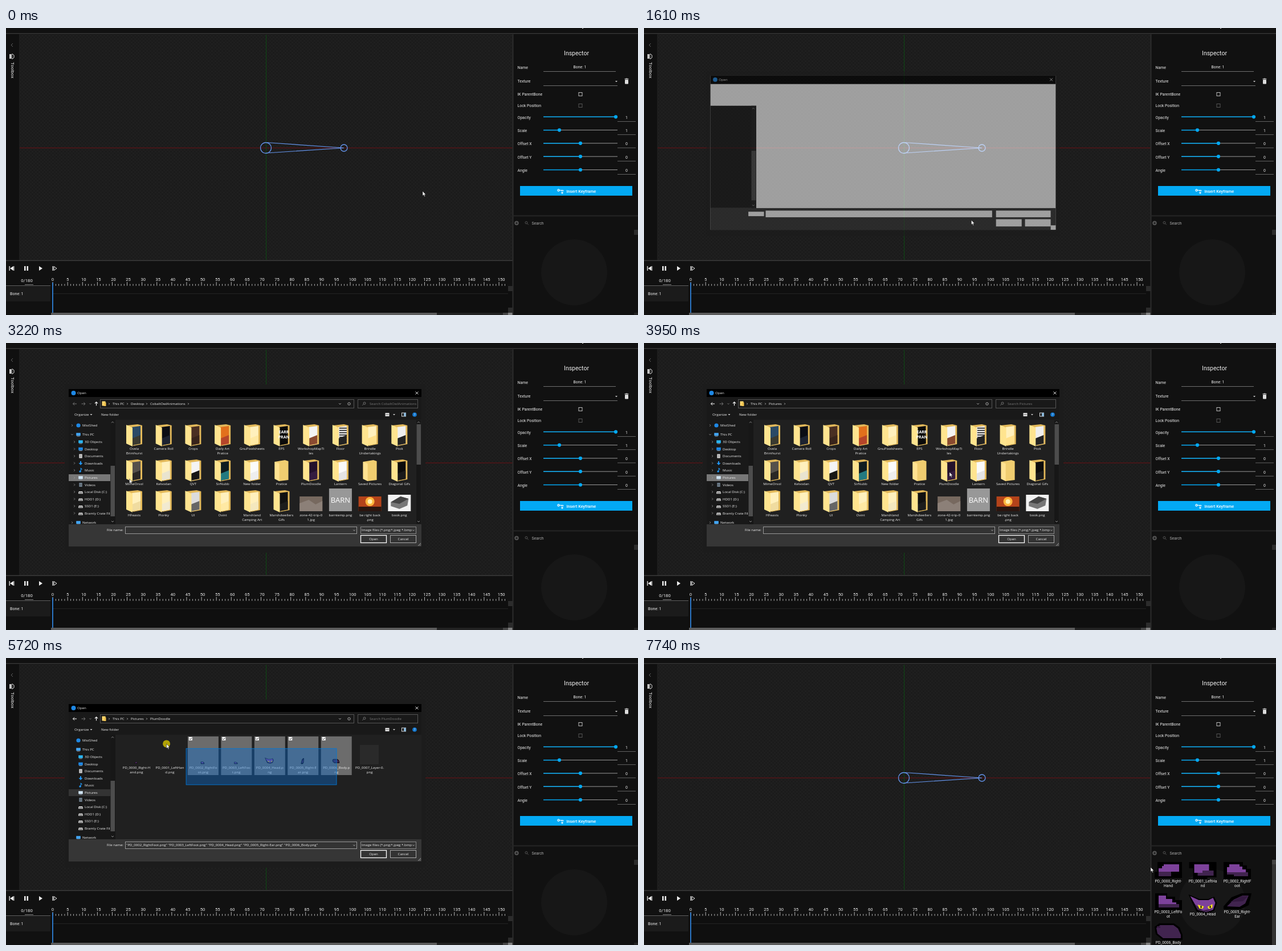
Write an HTML page that moves like this. It is 1109x505 px and loops after 8 s.

```html
<!DOCTYPE html>
<html lang="en">
<head>
<meta charset="utf-8">
<title>Bone editor</title>
<style>
html, body { margin: 0; width: 100%; height: 100%; overflow: hidden; background: #111; }
svg { display: block; width: 100%; height: 100%; }
text { font-family: Roboto, sans-serif; white-space: pre; }
.win text { font-family: "Open Sans", "Noto Sans", sans-serif; }
</style>
</head>
<body>
<svg id="stage" viewBox="0 0 1109 505" xmlns="http://www.w3.org/2000/svg"></svg>
<script>
const LOOP = 8000;
const BLUE = '#03a9f4';

// ---- drawing helpers ----
const rect = (x, y, w, h, fill, more = '') =>
  `<rect x="${x}" y="${y}" width="${w}" height="${h}" fill="${fill}" ${more}/>`;
const box = (x, y, w, h, stroke, fill = 'none', sw = 1) =>
  rect(x + .5, y + .5, w - 1, h - 1, fill, `stroke="${stroke}" stroke-width="${sw}"`);
const disc = (x, y, r, fill, more = '') => `<circle cx="${x}" cy="${y}" r="${r}" fill="${fill}" ${more}/>`;
const ring = (x, y, r, stroke, sw = 1) => disc(x, y, r, 'none', `stroke="${stroke}" stroke-width="${sw}"`);
const path = (d, fill, more = '') => `<path d="${d}" fill="${fill}" ${more}/>`;
const line = (d, stroke, sw = 1) => path(d, 'none', `stroke="${stroke}" stroke-width="${sw}"`);
const text = (x, y, s, size = 6.9, fill = '#eee', anchor = 'start', more = '') =>
  `<text x="${x}" y="${y + size * .36}" font-size="${size}" fill="${fill}" text-anchor="${anchor}" ${more}>${s}</text>`;
const group = (body, attrs = '') => `<g ${attrs}>${body}</g>`;
const at = (x, y, body, k = 1) => group(body, `transform="translate(${x} ${y}) scale(${k})"`);
const chevron = (x, y, dir, color = '#aaa', r = 2) => at(x, y, line({
  r: `M${-r / 2},${-r}L${r / 2},0L${-r / 2},${r}`,
  l: `M${r / 2},${-r}L${-r / 2},0L${r / 2},${r}`,
  d: `M${-r},${-r / 2}L0,${r / 2}L${r},${-r / 2}`,
  u: `M${-r},${r / 2}L0,${-r / 2}L${r},${r / 2}`
}[dir], color, .8));
const caret = (x, y, color = '#ccc') => path(`M${x - 2},${y - 1}h4l-2,2.2z`, color);

// ---- editor ----
function viewport() {
  return rect(23, 11, 866, 398, 'url(#weave)') +
    rect(24, 210.5, 865, 1, '#6e1014') + rect(456, 12, 1, 396, '#0c4a12') +
    group(ring(456, 211, 9.5, '#6495ed', 1.3) + ring(593, 211, 6, '#6495ed', 1.3) +
      line('M457,201.5L593,211L457,220', '#6495ed', 1.2));
}

function toolbar() {
  return rect(0, 0, 1109, 9, '#111') + rect(0, 9, 1109, 1.3, '#3a3a3a') + rect(1011, 0, 2, 1, '#ddd') +
    rect(0, 11, 23, 398, '#101010') + chevron(10.5, 30, 'l', '#777', 3) +
    rect(6, 46, 3, 8, '#ccc') + path('M10,46h2l2,2v4l-2,2h-2z', 'none', 'stroke="#ddd"') +
    at(11.5, 60, text(0, 0, 'Toolbox', 8, '#eee', 'start', 'transform="rotate(90)"'));
}

function timeline() {
  let s = rect(0, 409, 889, 96, '#111') + rect(0, 408.5, 889, 1.5, '#3a3a3a') +
    path('M13,419v8l-6,-4z', '#eee') + rect(5.5, 419, 1.3, 8, '#eee') + rect(13.5, 419, 1, 8, '#eee') +
    rect(32, 419, 2.5, 8, '#eee') + rect(36.5, 419, 2.5, 8, '#eee') +
    path('M58,419v8l6,-4z', '#eee') +
    rect(81.5, 419, 1.3, 8, '#eee') + path('M84,419.5v7l5,-3.5z', 'none', 'stroke="#eee"') +
    text(36.5, 444, '0/180', 7.8, '#eee', 'middle') + rect(33, 451, 15, .8, '#999') +
    rect(0, 453, 78, 1, '#666') + rect(0, 455, 78, 26, '#1b1b1b') + text(7, 467.5, 'Bone: 1', 7.1) +
    rect(78, 455, 811, 46, '#0f0f0f') + rect(82, 467, 799, 1, '#242424');
  for (let i = 0; i <= 152; i++) {
    const major = i % 5 === 0;
    s += rect(81.6 + i * 5.22, major ? 447 : 450.5, .9, major ? 6.5 : 3, '#ccc');
    if (major && i <= 150) s += text(79.8 + i * 5.22, 442, i, 7.6);
  }
  return s + rect(81, 448, 1.8, 57, '#2f80d8') +
    rect(79, 501, 810, 4, '#222') + rect(79, 501, 677, 4, '#5c5c5c') +
    rect(872, 501, 9, 4, '#444') + rect(881, 501, 8, 4, '#808080') +
    rect(881, 454, 8, 9, '#2c2c2c') + rect(881, 492, 8, 9, '#2c2c2c');
}

function slider(label, y, knob, value) {
  return text(897.5, y + 1, label) + rect(943, y - .7, 130, 1, '#999') +
    rect(943, y - .9, knob - 943, 1.5, BLUE) + disc(knob, y - .2, 3.1, BLUE) +
    text(1089, y + 1, value, 6.9, '#eee', 'middle') + rect(1073, y + 7.5, 32, .8, '#777');
}

function inspector() {
  return rect(889, 11, 220, 494, '#111') + rect(888.5, 11, 2, 494, '#2c2c2c') +
    text(1001, 44, 'Inspector', 10.5, '#eee', 'middle') +
    text(897.5, 70, 'Name') + text(1007, 69, 'Bone: 1', 6.9, '#eee', 'middle') + rect(943, 76, 127, .8, '#888') +
    text(897.5, 94, 'Texture') + rect(943, 101, 130, .8, '#888') + caret(1071, 94) +
    rect(1086, 91, 6, 7.5, '#ddd', 'rx="1"') + rect(1085.5, 89.2, 7, 1.1, '#ddd') + rect(1087.5, 88.5, 3, 1, '#ddd') +
    text(897.5, 116.5, 'IK ParentBone') + box(1004.5, 113, 7, 7, '#bbb') +
    text(897.5, 136.5, 'Lock Position') + box(1004.5, 133, 7, 7, '#555') +
    slider('Opacity', 156.5, 1070, 1) + slider('Scale', 179.8, 971, 1) + slider('Offset X', 203, 1008, 0) +
    slider('Offset Y', 226.3, 1008, 0) + slider('Angle', 249.7, 1008, 0) +
    rect(902, 278, 197, 17, BLUE) + text(983.5, 287, 'Insert Keyframe', 7.25, '#fff', 'start', 'font-weight="500"') +
    ring(969.5, 285.5, 1.6, '#fff', 1.2) + line('M971,285.5h6.5v2M975,285.5v2M974,290h4M976,288v4', '#fff', 1.1) +
    rect(889, 329.5, 220, 2, '#262626') +
    disc(896, 343.3, 3.7, '#555') + line('M894,343.3h4M896,341.3v4', '#111') +
    ring(913, 342.5, 2, '#555') + line('M914.5,344l2.3,2.3', '#555') + text(922.5, 343.5, 'Search', 6.9, '#aaa') +
    disc(997, 430, 58, '#171717') +
    rect(1102, 355, 7, 9, '#2c2c2c') + rect(1102, 501, 7, 4, '#222');
}

// ---- sprites: black silhouette, then coloured patches ----
const LIGHT = '#7d429b', DARK = '#41244f';
const sprites = [
  ['M-19,-15H24V13H-24V2H-19Z', 'M-8,-11H19V2H-17V-4H-11V-8H-8Z', 'M-17,2H5V10H-17Z'],
  ['M-24,-15H24V12H8V15H-17V-4H-24Z', 'M-15,-11H11V0H0V4H-15Z', 'M-9,4H0V0H19V9H-9Z'],
  ['M-24,-15H10V-9H17V-3H24V15H-24Z', 'M-14,-11H4V-7H9V-2H15V3H-18V-6H-14Z', 'M-18,3H19V10H-6V7H-18Z'],
  ['M-23,-14H-2V-8H12V-2H24V15H-23Z', 'M-17,-10H-4V-4H7V2H14V5H-17Z', 'M-17,5H19V11H-17Z'],
  ['M-25,-17L-6,-9H10L20,-13L25,-2L20,12L6,17L-11,13L-17,1Z', 'M-22,-14L-7,-7H10L18,-11L22,-2L18,10L6,14L-9,10L-14,0Z', 'M-14,0L0,11L18,8L6,14L-9,10Z'],
  ['M-24,9L-10,-7L8,-14H25L20,7L6,14H-24Z', 'M-12,1L8,-9H19L10,0Z', 'M-18,9L-6,-3L9,-10H20L14,4L4,10Z'],
  ['M-24,-9L-16,-15H10L20,-8L25,5V14H-10L-22,4Z', 'M-20,-7H-14V-10H-20Z', 'M-21,-7L-14,-12H9L17,-6L22,5V11H-9L-19,3Z']
];
function sprite(i) {
  const [edge, lit, shade] = sprites[i];
  const eyes = i === 4 ? path('M-9,1L2,4L0,8H-6ZM8,5L17,0V6L11,9Z', '#f2df22') + rect(-4, 3, 2, 4, '#111') + rect(12, 3, 2, 4, '#111') : '';
  const low = i >= 5;
  return path(edge, '#000') + path(low ? shade : lit, low ? DARK : LIGHT) + path(low ? lit : shade, low ? '#33193f' : DARK) + eyes;
}

const parts = ['Right-Hand', 'LeftHand', 'RightFoot', 'LeftFoot', 'Head', 'Right-Ear', 'Body', 'Layer-0'];
const partName = i => `PD_000${i}_${parts[i]}`;

function assets() {
  let s = rect(1102, 355, 7, 150, '#333') + rect(1102, 355, 7, 8, '#444');
  for (let i = 0; i < 7; i++) {
    const x = 920 + (i % 3) * 60.5, row = Math.floor(i / 3);
    const name = partName(i), short = name.length <= 12;
    s += at(x, 374 + row * 54 + (i === 4 ? 5 : 0), sprite(i));
    const y = [393, 447, 501][row] + (i === 4 ? 4 : 0);
    s += text(x, y, short ? name : name.slice(0, 14), 6.7, '#eee', 'middle');
    if (!short) s += text(x, y + 8, name.slice(14), 6.7, '#eee', 'middle');
  }
  return s;
}

// ---- file window ----
const WT = 6.1;
const label = (x, y, s, fill = '#eee', anchor = 'start') => text(x, y, s, WT, fill, anchor);

function skeleton() {
  const w = '#fff';
  return rect(110, 81, 619, 277, w) + rect(110, 81, 619, 15, '#000') + rect(110, 135, 82, 184, '#191919') +
    rect(183, 135, 9, 184, '#1d1d1d') + rect(183.5, 216, 8, 89, '#4d4d4d') +
    chevron(187, 140, 'u') + chevron(187, 314, 'd') + rect(110, 319, 619, 39, '#363636') +
    rect(178, 325.5, 28, 8, w) + rect(209, 323.5, 406, 12, w) + rect(622, 323.5, 98, 12, w) +
    rect(622, 339, 46, 13, w) + rect(674, 339, 46, 13, w) + rect(720, 350, 9, 8, w);
}
const titleBar = () => disc(118.5, 88, 4, '#1e88e5') + label(125, 88.3, 'Open') +
  line('M718.5,85.5l5,5m0,-5l-5,5', '#eee', .9);

const places = [
  ['MistShed', 145, '#1e88e5', 'o'], ['This PC', 161, '#42a5f5'], ['3D Objects', 174, '#29b6f6'],
  ['Desktop', 186.5, '#1e88e5'], ['Documents', 199, '#ddd', 'p'], ['Downloads', 211.5, '#2196f3', 'v'],
  ['Music', 224, '#2196f3', 'n'], ['Pictures', 237, '#cfe3f2'], ['Videos', 249.5, '#6d7f8f', 'p'],
  ['Local Disk (C:)', 262, '#ccc', 'd'], ['HDD1 (D:)', 274.5, '#ccc', 'd'], ['SSD1 (E:)', 287, '#ccc', 'd'],
  ['Bramly Crate File', 299.5, '#ccc', 'd'], ['Network', 316, '#42a5f5']
];
function placeIcon(x, y, c, kind) {
  if (kind === 'o') return disc(x, y, 3.6, c);
  if (kind === 'p') return rect(x - 2.7, y - 3.5, 5.4, 7, c) + rect(x - 1.5, y - 1.5, 3, .8, '#555') + rect(x - 1.5, y + .7, 3, .8, '#555');
  if (kind === 'v') return path(`M${x - 1},${y - 3.5}h2v3h2.5l-3.5,4l-3.5,-4h2.5z`, c);
  if (kind === 'n') return disc(x - 1, y + 2, 1.7, c) + line(`M${x + .3},${y + 2}v-5.5l2.2,2`, c, 1.1);
  if (kind === 'd') return path(`M${x - 3},${y - 1}h6l1,2v2.2h-8v-2.2z`, c) + rect(x - 3, y + 1.2, 6, .8, '#333');
  return rect(x - 3.8, y - 2.8, 7.6, 5, c) + rect(x - 2.6, y + 2.6, 5.2, .9, '#9ab');
}

function sidebar() {
  let s = rect(110, 135, 82, 184, '#191919') + rect(110, 231, 73, 12, '#333', 'id="place"');
  let arrows = '';
  for (const [name, y, color, kind] of places) {
    const inner = y > 165 && y < 310;
    s += placeIcon(inner ? 131 : 127, y, color, kind) + label(inner ? 138 : 134, y, name);
    arrows += chevron(inner ? 120 : 116, y, name === 'This PC' ? 'd' : 'r', '#999', 1.8);
  }
  return s + group(arrows, 'id="arrows"') + rect(183, 135, 9, 184, '#171717') + rect(183.5, 216, 7.5, 89, '#4d4d4d') +
    chevron(187, 139.5, 'u') + chevron(187, 314, 'd');
}

const crumbs = (mid, last, more) => chevron(181, 107, 'r', '#ccc', 1.4) + label(187, 107, 'This PC') +
  chevron(213, 107, 'r', '#ccc', 1.4) + label(219, 107, mid) +
  (last ? chevron(247, 107, 'r', '#ccc', 1.4) + label(253, 107, last) : '') +
  (more ? chevron(last ? 320 : 247, 107, 'r', '#ccc', 1.4) : '') +
  label(638, 107, 'Search ' + (last || mid), '#777');

const folders = [
  ['Ovela|Brimhurst', '#2b4a66', '#3a3a30'], ['Camera Roll', '#0b0d14', '#1c2230'], ['Crops', '#4a2f22', '#38241b'],
  ['Daily Art|Pratice', '#e2701c', '#b5452a'], ['GnuPixelsheets', '#fff0bd', '#ffe9a4'], ['EPS', '#0a0a0a', '#0a0a0a'],
  ['WorkshopMapTi|les', '#f4f4f4', '#8a4a30'], ['Floor', '#e8e8e8', '#222'], ['Brindle|Undertakings', '#fff0bd', '#ffe08a'],
  ['Ptok', '#efefef', '#222'],
  ['MimeOrsol', '#55504b', '#2a2725'], ['Kelvodan', '#fff0bd', '#e9e4cf'], ['QVT', '#f4f4f4', '#161616'],
  ['SirNubb', '#101c20', '#237a80'], ['New folder', '#fbfbfb', '#eee'], ['Pratice'], ['PlumDoodle', '#24122c', '#341c40'],
  ['Lantern', '#fafafa', '#e4e4e4'], ['Saved Pictures'], ['Diagonal Gifs', '#0c0c0c', '#1a1a1a'],
  ['HFeasts', '#fff0bd', '#f0dca0'], ['Plonky', '#fff0bd', '#f2ead0'], ['UI', '#dcdcdc', '#666'],
  ['Ovint', '#fff0bd', '#ffe9a4'], ['Marshland|Camping Art', '#fff0bd', '#f4e8be'], ['Marshdwellers|Gifs', '#111', '#1c1c1c'],
  ['zone-42-trip-0|1.jpg'], ['barntemp.png'], ['be right back|.png'], ['book.png']
];
function folder(a, b) {
  if (!a) return path('M-12,-15L6,-18L12,-16V17L-4,19L-12,15Z', '#f0cd70') + path('M-12,-15L-4,-12V19L-12,15Z', '#ffe291');
  return path('M-13,-17L6,-19L14,-17V16L-2,19Z', '#e3b95a') + path('M-4,-14L11,-16V15L-4,18Z', a) +
    path('M-4,6L11,0V15L-4,18Z', b) + path('M-14,-18L-3,-13V20L-14,15Z', '#ffe48f');
}
const pictures = [
  rect(-20, -8, 40, 26, '#77695f') + path('M-20,4L-4,-2L8,6L20,0V18H-20Z', '#8c8078'),
  rect(-20, -22, 40, 40, '#989898') + text(0, -2, 'BARN', 13, '#fff', 'middle'),
  rect(-20, -8, 40, 26, '#b4431a') + disc(0, 1, 8, '#ffb43c') + disc(0, 1, 4, '#fff0b0') + rect(-20, 10, 40, 8, '#2b1610'),
  rect(-20, -11, 40, 29, '#f2f2f2') + path('M-15,2L2,-8L16,-4L14,8L0,14L-15,9Z', '#777') + path('M-15,2L2,-8L16,-4L0,5Z', '#444')
];
function library() {
  let s = '';
  folders.forEach(([name, a, b], i) => {
    const x = 225 + (i % 10) * 51.7, row = Math.floor(i / 10);
    const y = [162, 224, 278][row];
    s += at(x, y, i >= 26 ? pictures[i - 26] : folder(a, b));
    if (name === 'EPS') s += text(x + 4, y - 6, 'EARR', 7, '#fff', 'middle', 'font-weight="700"') + text(x + 4, y + 3, 'PRAN', 7, '#fff', 'middle', 'font-weight="700"');
    if (name === 'Floor') for (let k = 0; k < 6; k++) s += rect(x - 2, y - 13 + k * 4, 13, 1.6, '#222');
    name.split('|').forEach((part, k) => s += label(x, [186, 248, 302.5][row] + k * 8, part, '#eee', 'middle'));
  });
  return s + rect(720, 136, 8, 182, '#171717') + rect(720.5, 143, 7.5, 71, '#4d4d4d') +
    chevron(724, 139.5, 'u') + chevron(724, 314, 'd');
}

const tileX = i => 229 + i * 58.45;
const tileScale = [.09, .06, .13, .13, .31, .24, .25];
function tiles() {
  let s = '';
  for (let i = 0; i < 8; i++) {
    const x = tileX(i), full = partName(i) + '.png', cut = i === 7 ? 16 : i === 4 || i === 6 ? 14 : 15;
    s += rect(x - 27, 138, 54, 68, '#333', `class="pick"`);
    s += i === 7 ? rect(621, 153, 33, 34, '#2a2a2a')
      : at(x - 1, i < 4 ? 184.5 : i === 4 ? 180.5 : 181.5, sprite(i), i === 5 ? '.11 .36' : tileScale[i]);
    s += label(x, 193, full.slice(0, cut), '#eee', 'middle') + label(x, 201, full.slice(cut), '#eee', 'middle');
    s += group(rect(x - 25, 139, 6, 6, '#fff') + line(`M${x - 24},142l1.5,1.6l2.6,-3.2`, '#222', .9), 'class="tick"');
  }
  return s + rect(0, 152, 0, 71, '#0a6bd0', 'id="band" fill-opacity=".4" stroke="#0078d7" stroke-width=".9"');
}

function fileWindow() {
  return rect(110, 81, 619, 15, '#000') + rect(110, 95, 619, 40, '#191919') +
    line('M124,107h-6.5m2.6,-2.6l-2.6,2.6l2.6,2.6', '#fff', 1).replace('<path', '<path id="back"') +
    line('M132.5,107h6.5m-2.6,-2.6l2.6,2.6l-2.6,2.6', '#777') + chevron(148, 107, 'd', '#999', 1.5) +
    line('M158.5,110.3v-6.5m-2.6,2.6l2.6,-2.6l2.6,2.6', '#fff', 1.1) +
    box(165, 99, 446, 16, '#555') + rect(168.5, 102.5, 6, 8, '#ffd970') + rect(171.5, 104.5, 4, 6.5, '#f0c350') +
    chevron(586, 107, 'd', '#bbb') + ring(602, 107, 2.2, '#bbb', .9) +
    box(617, 99, 106, 16, '#555') + ring(629, 106, 2, '#888', .8) + line('M627.5,107.5l-2.2,2.2', '#888', .8) +
    group(crumbs('Desktop', 'CobaltOwlAnimations', true), 'id="path0"') +
    group(crumbs('Pictures', '', true), 'id="path1"') + group(crumbs('Pictures', 'PlumDoodle', false), 'id="path2"') +
    label(120, 126, 'Organize') + caret(149.5, 126) + label(167, 126, 'New folder') +
    rect(665.5, 123, 7, 6, '#ddd') + rect(666.5, 125.5, 5, .8, '#444') + caret(681, 126) +
    box(694, 122.5, 8, 7, '#ddd') + rect(698, 123, 4, 6, '#8ab6d8') +
    disc(717, 126, 3.8, '#1479d1') + text(717, 126, '?', 6, '#fff', 'middle') +
    sidebar() + rect(192, 135, 537, 184, '#202020') +
    group(library(), 'id="library"') + group(tiles(), 'id="tiles"') +
    rect(110, 319, 619, 39, '#363636') + label(206, 329.3, 'File name:', '#eee', 'end') +
    box(209, 323, 407, 13, '#999', '#333') + group(label(211, 329.3, '').replace('<text', '<text id="names"'), 'clip-path="url(#field)"') +
    chevron(611, 329.5, 'd', '#ccc', 1.7) + box(622, 323, 98, 13, '#888', '#333') +
    label(624, 329.3, 'Image files (*.png;*.jpeg *.bmp') + chevron(715, 329.5, 'd', '#ccc', 1.7) +
    box(622, 338, 46, 14, '#fff', '#333', 1.3) + label(645, 345, 'Open', '#eee', 'middle') +
    box(674, 338, 46, 14, '#aaa', '#333') + label(697, 345, 'Cancel', '#eee', 'middle') +
    line('M723,357l5,-5m-2.5,5l2.5,-2.5', '#aaa', .9);
}

const stage = document.getElementById('stage');
stage.innerHTML =
  `<defs><pattern id="weave" width="6" height="6" patternUnits="userSpaceOnUse">
    ${rect(0, 0, 6, 6, '#1f1f1f') + rect(0, 0, 3, 3, '#1b1b1b') + rect(3, 3, 3, 3, '#1b1b1b')}</pattern>
    <clipPath id="field">${rect(210, 323, 396, 13, '#000')}</clipPath></defs>` +
  rect(0, 0, 1109, 505, '#111') + viewport() + toolbar() + timeline() + inspector() +
  group(assets(), 'id="assets"') +
  group(rect(103, 73, 633, 296, '#1c1c1c') + group(skeleton(), 'id="skeleton"') +
    group(fileWindow(), 'id="full"') + titleBar(), 'id="win" class="win"') +
  disc(0, 0, 6.5, '#d2c000', 'id="halo" fill-opacity=".82"') +
  group(path('M0,0V8.3L1.9,6.6L3.2,9.7L4.5,9.1L3.2,6.2H5.7Z', '#fff', 'stroke="#000" stroke-width=".5"'), 'id="cursor"');

// ---- motion ----
const moves = [
  [30, 731, 287], [400, 882, 396], [600, 962, 426], [790, 1001, 388], [840, 1001, 388], [970, 936, 384],
  [1090, 957.5, 394.5], [1420, 957.5, 394.5], [1610, 575.5, 338], [1850, 300, 308], [2200, 195, 320],
  [2500, 160, 290], [2800, 150, 237], [2900, 150, 237], [3020, 216.5, 239], [3230, 216.5, 239], [3670, 536, 227],
  [4480, 536, 227], [4750, 556, 254], [5020, 550, 225.5], [5270, 572, 222], [5330, 579.5, 223], [5380, 579.5, 223],
  [5720, 282, 151], [5920, 197.5, 145], [6110, 197.5, 145], [6560, 640, 350], [6720, 650.5, 346],
  [7010, 650.5, 346], [7400, 800, 362], [7740, 889, 368]
];
const clicks = [[1230, 1280], [2830, 2930], [3860, 3930], [3980, 4060], [5330, 6110], [6800, 6910]];

const ramp = (t, a, b) => Math.min(1, Math.max(0, (t - a) / (b - a)));
function pointer(t) {
  const i = moves.findIndex(m => m[0] >= t);
  if (i === 0) return moves[0].slice(1);
  if (i < 0) return moves[moves.length - 1].slice(1);
  const [a, x0, y0] = moves[i - 1], [b, x1, y1] = moves[i];
  const k = ramp(t, a, b);
  return [x0 + (x1 - x0) * k, y0 + (y1 - y0) * k];
}

const ui = id => document.getElementById(id);
const show = (el, on) => { el.style.display = on ? '' : 'none'; };
const picks = [...document.querySelectorAll('.pick')], ticks = [...document.querySelectorAll('.tick')];

function draw(t) {
  const [x, y] = pointer(t);
  ui('cursor').setAttribute('transform', `translate(${x} ${y})`);
  ui('halo').setAttribute('transform', `translate(${x} ${y})`);
  show(ui('halo'), clicks.some(([a, b]) => t >= a && t < b));
  show(ui('assets'), t >= 7280);

  const open = ramp(t, 1450, 1730) * (1 - ramp(t, 7010, 7190));
  const win = ui('win');
  show(win, open > 0);
  win.setAttribute('opacity', open);
  win.setAttribute('transform', `translate(419.5 219.5) scale(${.95 + .05 * open}) translate(-419.5 -219.5)`);
  show(ui('skeleton'), t < 1850);
  show(ui('full'), t >= 1850);

  const stop = t < 3300 ? 0 : t < 3960 ? 1 : 2;
  for (let i = 0; i < 3; i++) show(ui('path' + i), i === stop);
  ui('back').setAttribute('stroke', stop ? '#fff' : '#777');
  show(ui('place'), t >= 2830);
  ui('place').setAttribute('fill', t < 3960 ? '#777' : '#333');
  ui('arrows').setAttribute('opacity', ramp(t, 2250, 2450) * (1 - ramp(t, 4330, 4700)));
  show(ui('library'), t >= 3070 && t < 3960);
  show(ui('tiles'), t >= 4050);

  const left = pointer(Math.min(t, 6110) - 40)[0];
  const dragging = t >= 5380 && t < 6110;
  const band = ui('band');
  show(band, dragging);
  if (dragging) {
    const top = pointer(t - 40)[1];
    band.setAttribute('x', left);
    band.setAttribute('width', Math.max(0, 580 - left));
    band.setAttribute('y', Math.min(top, 223));
    band.setAttribute('height', Math.max(0, 223 - top));
  }
  const chosen = [];
  picks.forEach((p, i) => {
    const on = t >= 5400 && i < 7 && left < tileX(i) + 27;
    if (on) chosen.push(`"${partName(i)}.png"`);
    show(p, on);
    show(ticks[i], on);
    p.setAttribute('fill', t < 6800 ? '#6c6c6c' : '#333');
  });
  ui('names').textContent = chosen.join(' ');
}

const start = performance.now();
function tick() {
  draw((performance.now() - start) % LOOP);
  requestAnimationFrame(tick);
}
tick();
</script>
</body>
</html>
```
